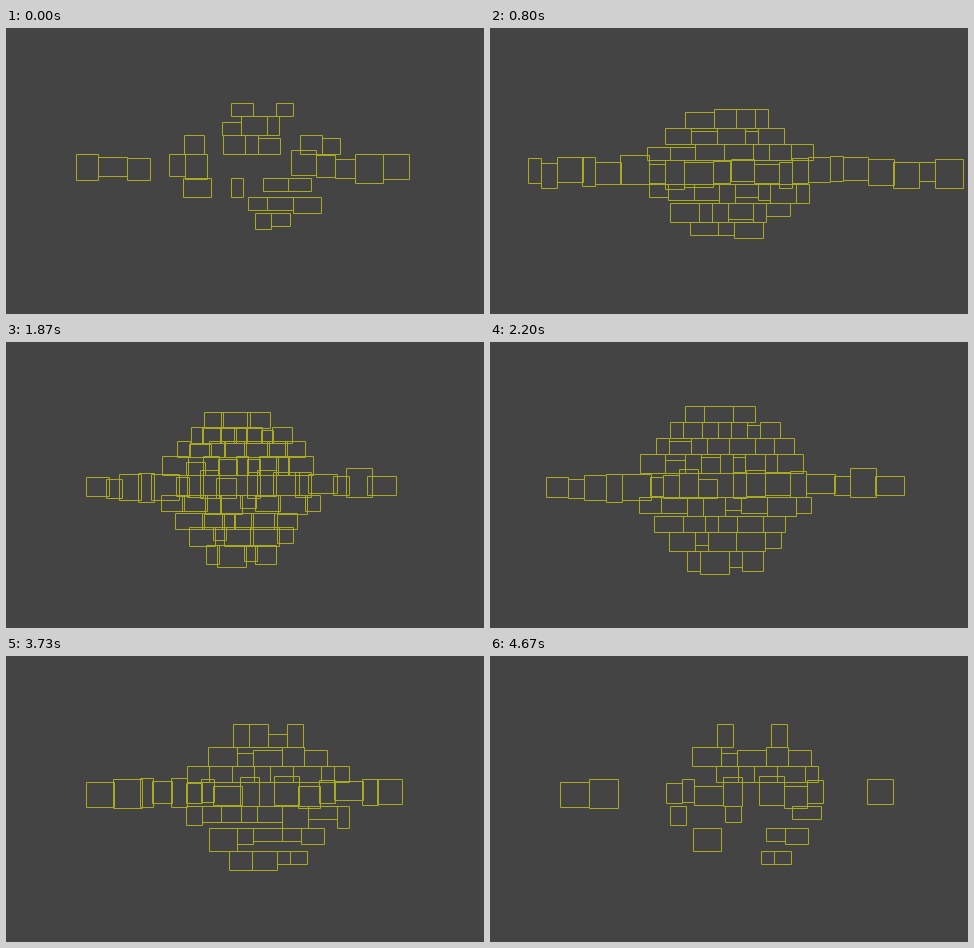
Recreate the animation shown at these times as an HTML page with a canvas. Size 478 px wide and 286 px high, loop 6200 ms.

```html
<!DOCTYPE html>
<html lang="en">
<head>
<meta charset="utf-8">
<title>Room separation</title>
<style>
html, body { margin: 0; width: 100%; height: 100%; overflow: hidden; background: #444; }
canvas { display: block; }
</style>
</head>
<body>
<canvas id="stage" width="478" height="286"></canvas>
<script>
const TILE = 3.2, FPS = 15, LOOP = 6200;
const MIN_SIDE = 4 * TILE;
const CORE = 105;      // half width of the core next to the long row
const KEEP = 0.62;     // share of rooms that survive the trim
const DRAG = 0.7;      // sideways travel left after each tick

// Ticks of 1/15 s: rooms appear at "start", spare ones vanish at "trim".
// "slide" is the travel the ends of the long row still have ahead at tick 0.
const layouts = [
  { start: 0, trim: 0, slide: 0, seed: 11,
    left: 70, right: 403, top: 72, bottom: 209, mid: 138, core: 256 },
  { start: 2, trim: 18, slide: 54, seed: 23,
    left: 37, right: 475, top: 69, bottom: 220, mid: 144, core: 240 },
  { start: 27, trim: 44, slide: 17, seed: 37,
    left: 54, right: 416, top: 51, bottom: 240, mid: 143, core: 235 },
  { start: 53, trim: 70, slide: 26, seed: 41,
    left: 70, right: 403, top: 68, bottom: 222, mid: 138, core: 262 }
];

function seeded(seed) {
  return () => {
    seed = (seed + 0x6d2b79f5) | 0;
    let t = Math.imul(seed ^ (seed >>> 15), 1 | seed);
    t = (t + Math.imul(t ^ (t >>> 7), 61 | t)) ^ t;
    return ((t ^ (t >>> 14)) >>> 0) / 4294967296;
  };
}

function buildRooms(layout) {
  const { left, right, top, bottom, mid, core } = layout;
  const random = seeded(layout.seed);
  const side = (min, max) => (min + Math.floor(random() * (max - min + 1))) * TILE;
  const rooms = [];

  // Rooms side by side, from one x towards another.
  function fillRow(from, to, place) {
    const dir = Math.sign(to - from);
    let gap = Math.abs(to - from);
    while (gap >= MIN_SIDE) {
      const w = Math.min(side(4, 9), gap);
      const x = dir > 0 ? to - gap : to + gap - w;
      rooms.push({ x, w, kept: random() < KEEP, ...place() });
      gap -= w;
    }
  }

  const inLongRow = () => {
    const h = side(6, 9);
    return { y: mid - h / 2 + (random() - 0.5) * 8, h, arm: true };
  };
  fillRow(left, core, inLongRow);
  fillRow(right, core, inLongRow);

  // Rows stack away from the long one and grow narrower.
  for (const [edge, dir] of [[top, -1], [bottom, 1]]) {
    const depth = Math.abs(edge - mid);
    let d = 12;
    while (depth - d >= MIN_SIDE) {
      const pitch = Math.min(side(5, 7), depth - d);
      const half = CORE * (1 - 0.8 * (d + pitch / 2) / depth);
      const inner = d;
      fillRow(core - half, core + half, () => {
        const h = Math.min(side(4, 8), pitch);
        return { y: dir < 0 ? mid - inner - h : mid + inner, h };
      });
      d += pitch;
    }
  }
  return rooms;
}

layouts.forEach(l => l.rooms = buildRooms(l));

const ctx = document.getElementById("stage").getContext("2d");
ctx.strokeStyle = "rgb(170, 170, 34)";

function outline(x, y, w, h) {
  const x0 = Math.round(x), y0 = Math.round(y);
  ctx.rect(x0 + 0.5, y0 + 0.5, Math.round(x + w) - x0, Math.round(y + h) - y0);
}

function draw(ms) {
  const tick = Math.floor((ms + 4) * FPS / 1000);
  const layout = layouts.filter(l => l.start <= tick).pop();
  const { left, right, mid, core } = layout;
  const step = tick - layout.start;
  const settled = tick >= layout.trim;
  const travel = settled ? 0 : layout.slide * Math.pow(DRAG, step);
  const squeeze = settled ? 0 : 0.2 * Math.max(0, 1 - step / 3) ** 2;

  ctx.fillStyle = "#444";
  ctx.fillRect(0, 0, 478, 286);
  ctx.beginPath();
  for (const { x, y, w, h, arm, kept } of layout.rooms) {
    if (settled && !kept) continue;
    const dx = x + w / 2 - core;
    const reach = arm ? dx / (right - left) * 2 : 0;
    outline(x - reach * travel - dx * squeeze, y - (y + h / 2 - mid) * squeeze, w, h);
  }
  ctx.stroke();
}

const began = performance.now();
function loop() {
  draw((performance.now() - began) % LOOP);
  requestAnimationFrame(loop);
}
loop();
</script>
</body>
</html>
```
